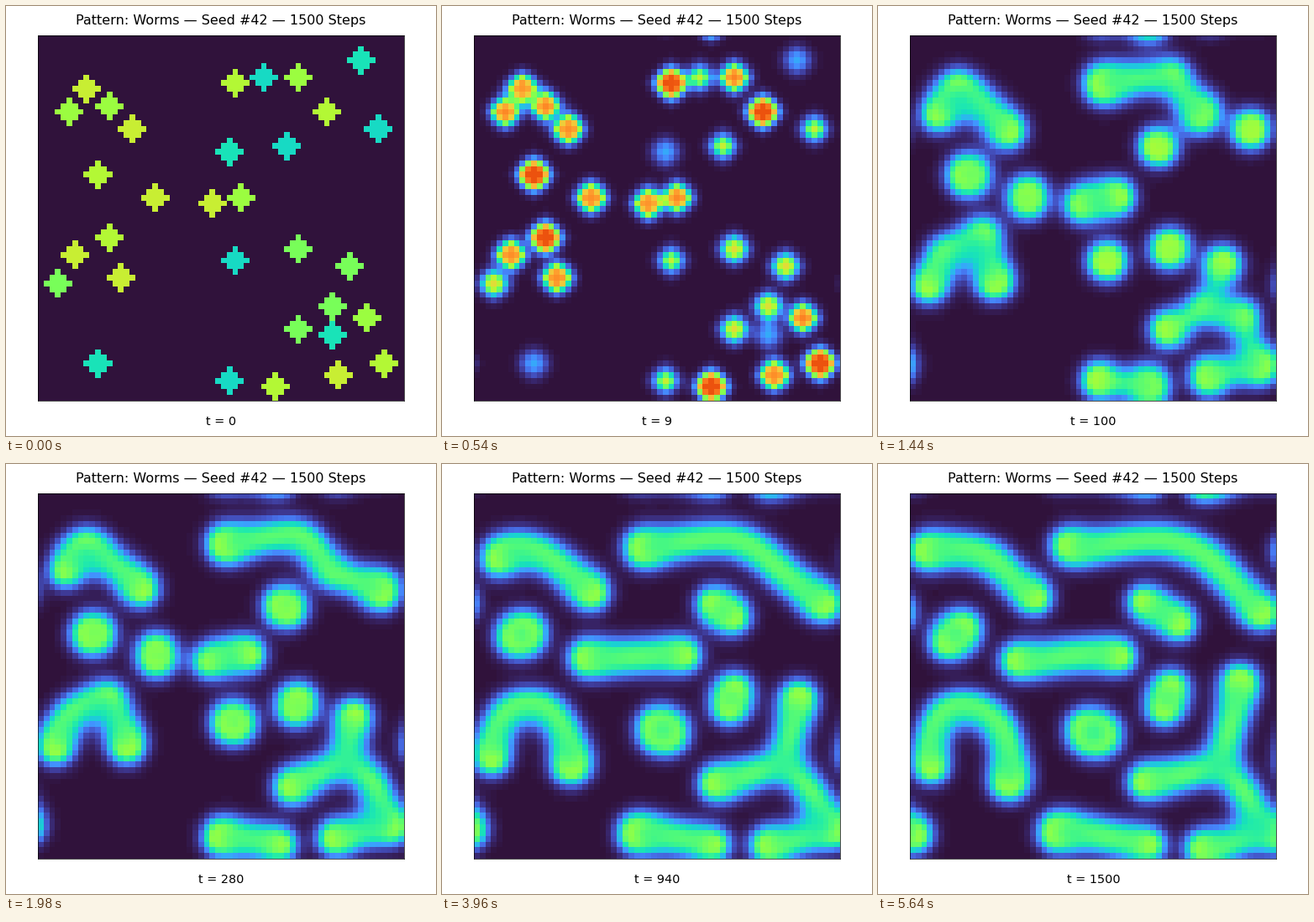
Animation, 512 px wide and 512 px high, one loop 8740 ms. Source, as a matplotlib script:

```python
import numpy as np
import matplotlib.pyplot as plt
from matplotlib.animation import FuncAnimation

SIZE = 64
STEPS = 1500
DIFF_U, DIFF_V, FEED, KILL = 0.16, 0.08, 0.078, 0.061
TICK, HOLD, LOOP = 20, 60, 8740  # ms
STAGE = 512

# Starting drops by strength: (u, v) -> cells as (column, row)
DROPS = {
    (.78, .525): [(34, 8), (50, 13), (10, 24), (12, 35), (60, 57), (41, 61)],
    (.48, .555): [(8, 9), (16, 16), (20, 28), (30, 29), (6, 38), (14, 42), (52, 59)],
    (.57, .49): [(45, 7), (12, 12), (5, 13), (35, 28), (57, 49)],
    (.42, .45): [(45, 37), (54, 40), (3, 43), (51, 47), (45, 51)],
    (.72, .31): [(39, 7), (59, 16), (43, 19), (34, 39), (33, 60)],
    (.26, .33): [(56, 4), (33, 20), (51, 52), (10, 57)],
}


def laplacian(a):
    return (np.roll(a, 1, 0) + np.roll(a, -1, 0)
            + np.roll(a, 1, 1) + np.roll(a, -1, 1) - 4 * a)


def initial_fields():
    u, v = np.ones((SIZE, SIZE)), np.zeros((SIZE, SIZE))
    rows, cols = np.mgrid[:SIZE, :SIZE]
    for (u0, v0), cells in DROPS.items():
        for col, row in cells:
            disc = (cols - col) ** 2 + (rows - row) ** 2 <= 4
            u[disc], v[disc] = u0, v0
    return u, v


def simulate(times):
    """Gray-Scott reaction on a torus; returns v at each requested step."""
    u, v = initial_fields()
    wanted, states = set(times), []
    for step in range(STEPS + 1):
        if step in wanted:
            states.append(v.copy())
        reaction = u * v * v
        u, v = (u + DIFF_U * laplacian(u) - reaction + FEED * (1 - u),
                v + DIFF_V * laplacian(v) + reaction - (FEED + KILL) * v)
    return states


# Every step at first, then every twentieth
times = list(range(20)) + list(range(20, STEPS + 1, 20))
states = simulate(times)

fig = plt.figure(figsize=(STAGE / 100, STAGE / 100), dpi=100, facecolor="white")
ax = fig.add_axes(np.array([38.3, 41.6, 436, 435.2]) / STAGE)
ax.set(xticks=[], yticks=[])
ax.spines[:].set_linewidth(0.5)
image = ax.imshow(states[0], cmap="turbo", vmin=0, vmax=1,
                  interpolation="nearest", aspect="auto")


def centred_text(x, y, text, size):
    return fig.text(x / STAGE, y / STAGE, text, size=size, family="DejaVu Sans",
                    ha="center", va="baseline")


centred_text(256, 490, f"Pattern: Worms — Seed #42 — {STEPS} Steps", 11.5)
label = centred_text(256.5, 13, "t = 0", 10.35)


def update(i):
    n = min(i * TICK // HOLD, len(times) - 1)
    image.set_data(states[n])
    label.set_text(f"t = {times[n]}")
    return image, label


anim = FuncAnimation(fig, update, frames=LOOP // TICK, interval=TICK,
                     repeat=True, cache_frame_data=False)
plt.show()
```
